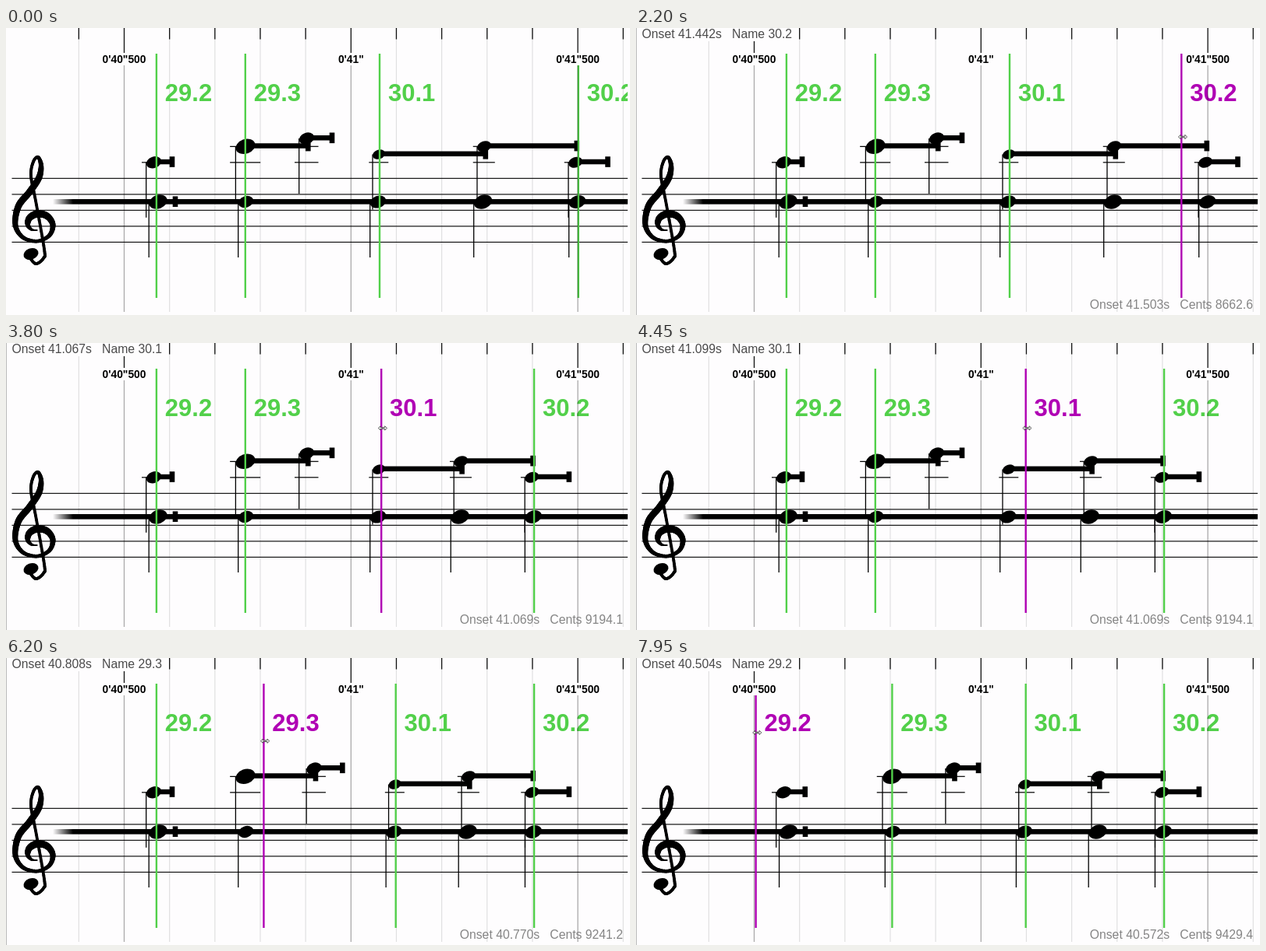
Animation, 800 px wide and 369 px high, one loop 8 s. Source, as an HTML page with a canvas:

```html
<!DOCTYPE html>
<html lang="en">
<head>
<meta charset="utf-8">
<title>Score alignment</title>
<style>
html, body { margin: 0; width: 100%; height: 100%; overflow: hidden; background: #fefdfe; }
canvas { display: block; }
</style>
</head>
<body>
<canvas id="stage" width="800" height="369"></canvas>
<script>
const ctx = document.getElementById('stage').getContext('2d');
const LOOP = 8000, RIGHT = 797, ORIGIN = 151.5, PX_PER_SEC = 581.6;
const STAFF_TOP = 193.3, SPACE = 20.5, LOWER_Y = 223.5;
const PAPER = '#fefdfe', GREEN = '#52d04a', PURPLE = '#b000b4', INK = '#000';

// Barlines in drag order. keys: [time, x]; grip: where the pointer takes hold;
// approach: pointer stops [time, x, y] on the way there.
const bars = [
  { name: '30.2', release: 2650, keys: [[1800, 734], [2500, 677.27]], grip: [735, 142],
    approach: [[0, 470, 385], [600, 196, 95], [1300, 734.3, 162.5], [1400, 736, 162]] },
  { name: '30.1', release: 4550, keys: [[3650, 479.2], [4400, 499.9]], grip: [482.4, 111.454],
    approach: [[2900, 637.1, 132.075], [3000, 568, 119]] },
  { name: '29.3', release: 6400, keys: [[5050, 307], [5450, 330.05], [6200, 330.63], [6400, 328.6]],
    grip: [308.5, 108.747], approach: [] },
  { name: '29.2', release: LOOP, keys: [[7000, 193.1], [LOOP, 153.54]], grip: [193.4, 97.931], approach: [] }
];
for (const b of bars) {
  b.grab = b.keys[0][0];
  b.start = b.keys[0][1];
  b.end = b.keys.at(-1)[1];
}
const pointerKeys = bars.flatMap(b =>
  [...b.approach, [b.grab, ...b.grip], [b.release, b.end, b.grip[1] - 2]]);

// Upper voice: x, scale steps above the lower voice, head size, length (default: up to the next note).
const upperNotes = [
  [189.5, 5, 10, 23.5], [307, 7, 12.8], [385.5, 8, 10, 32.5],
  [478, 6, 8.2], [613, 7, 9.2], [730, 5, 9.2, 41.5]
];
const lowerNotes = [[195, 12], [307.5, 10], [477, 10.5], [611.5, 12], [732.5, 11]];

const linear = k => k;
const smooth = k => k * k * (3 - 2 * k);

function track(keys, t, ease = smooth) {
  const next = keys.findIndex(key => key[0] >= t);
  if (next === 0) return keys[0].slice(1);
  if (next < 0) return keys.at(-1).slice(1);
  const [ta, ...a] = keys[next - 1], [tb, ...b] = keys[next];
  const k = ease((t - ta) / (tb - ta));
  return a.map((v, j) => v + (b[j] - v) * k);
}

const barX = (bar, t) => track(bar.keys, t)[0];
const isDragged = (bar, t) => t >= bar.grab && t < bar.release;
const onset = x => (40.5 + (x - ORIGIN) / PX_PER_SEC).toFixed(3) + 's';
const cents = y => (8305.9 + (162.5 - y) * 17.4).toFixed(1);

function pointerAt(t) {
  const bar = bars.find(b => isDragged(b, t));
  return bar && t > bar.grab ? [barX(bar, t) + 1.5, bar.grip[1] - 2] : track(pointerKeys, t);
}

// Notes keep their place between barlines, which count once released.
function makeWarp(t) {
  const anchors = bars.map(b => [b.start, t >= b.release ? b.end : b.start]).reverse();
  const keys = [[0, 0], ...anchors, [1034, 1034]];
  return x => track(keys, x, linear)[0];
}

function line(x1, y1, x2, y2, width, color = INK) {
  ctx.strokeStyle = color;
  ctx.lineWidth = width;
  ctx.beginPath();
  ctx.moveTo(x1, y1);
  ctx.lineTo(x2, y2);
  ctx.stroke();
}

function text(str, x, y, font, color, align = 'left') {
  ctx.font = font + ' "Liberation Sans", Arial, sans-serif';
  ctx.fillStyle = color;
  ctx.textAlign = align;
  ctx.fillText(str, x, y);
}

function rect(x, y, w, h, color = INK) {
  ctx.fillStyle = color;
  ctx.fillRect(x, y, w, h);
}

function polygon(points) {
  ctx.beginPath();
  for (const p of points) ctx.lineTo(...p);
  ctx.closePath();
}

function head(x, y, size) {
  ctx.fillStyle = INK;
  ctx.beginPath();
  ctx.ellipse(x, y, size, size * 0.73, -0.36, 0, 7);
  ctx.fill();
}

const tailEnd = (x, y) => rect(x - 3.3, y - 6.8, 6.6, 13.6);
const stem = (x, y, size, bottom) => line(x - size + 0.2, y, x - size + 0.2, bottom, 1.3);

// Treble clef as a brush path [x, y, width]: hook, stem and loop, then a spiral.
function makeClef() {
  const path = [
    [29, 293], [38, 303], [48, 296], [49, 284], [38, 222], [32, 190],
    [35, 172], [41, 166], [45, 177], [42, 193], [30, 211], [16, 229]
  ].map(([x, y], i) => [x, y, Math.max(3.8, Math.min(8.5, 2 * i - 10))]);
  for (let s = 0; s <= 1; s += 0.1) {
    const angle = Math.PI * (1 - 2.5 * s), r = 28 - 20 * s;
    const width = (6.8 - 2.3 * Math.sin(angle)) * Math.min(1, 0.3 + 3 * (1 - s));
    path.push([40 + r * Math.cos(angle), 253 + 0.88 * r * Math.sin(angle), width]);
  }
  return path;
}
const clef = makeClef();

function drawClef() {
  const at = i => clef[Math.max(0, Math.min(clef.length - 1, i))];
  ctx.lineCap = 'round';
  let last = clef[0];
  for (let i = 0; i < clef.length - 1; i++) {
    for (let k = 0.1; k < 1.05; k += 0.1) {
      const next = [0, 1, 2].map(j => {
        const [a, b, c, d] = [-1, 0, 1, 2].map(n => at(i + n)[j]);
        return b + k * (c - a + k * (2 * a - 5 * b + 4 * c - d + k * (3 * (b - c) + d - a))) / 2;
      });
      line(last[0], last[1], next[0], next[1], next[2]);
      last = next;
    }
  }
  ctx.lineCap = 'butt';
  head(32, 290.5, 9.8);
}

function drawNotes(warp) {
  const fade = ctx.createLinearGradient(60, 0, 86, 0);
  fade.addColorStop(0, 'rgba(0,0,0,0)');
  fade.addColorStop(1, INK);
  rect(60, LOWER_Y - 3.5, RIGHT - 60, 6.6, fade);
  tailEnd(217, LOWER_Y - 0.3);

  for (const [x0, size] of lowerNotes) {
    const x = warp(x0);
    stem(x, LOWER_Y, size, 295);
    head(x, LOWER_Y, size);
  }

  upperNotes.forEach(([x0, step, size, length], i) => {
    const x = warp(x0), y = LOWER_Y + 0.5 - step * SPACE / 2;
    const end = warp(length ? x0 + length : upperNotes[i + 1][0] + 1.8);
    for (let ledger = STAFF_TOP - SPACE; ledger > y - 4; ledger -= SPACE)
      line(x - size * 1.55, ledger, x + size * 1.5, ledger, 1.2);
    stem(x, y, size, y + 71);
    head(x, y, size);
    line(x, y - 0.7, end, y - 0.7, 6.4);
    tailEnd(end, y - 0.7);
  });
}

function gridLines(draw) {
  for (let i = -1; i <= 11; i++) draw(ORIGIN + i * PX_PER_SEC / 10, i % 5 === 0, i);
}

function drawRuler() {
  gridLines((x, major, i) => {
    line(x, 0, x, major ? 32 : 14.5, 1.3, '#111');
    if (!major) return;
    line(x, 48, x, 365, 1.3, 'rgba(0,0,0,.33)');
    const halves = 81 + i / 5;
    const label = `0'${halves >> 1}"${halves % 2 ? '500' : ''}`;
    const width = label.length * 7.2;
    rect(x - width / 2, 33, width, 15, PAPER);
    text(label, x, 45, 'bold 13.8px', INK, 'center');
  });
}

function outlineCursor() {
  ctx.fillStyle = '#fff';
  ctx.strokeStyle = '#444';
  ctx.lineWidth = 0.9;
  ctx.fill();
  ctx.stroke();
}

function drawArrow(x, y) {
  polygon([[0, 0], [0, 8.5], [2, 6.8], [3.3, 9.6], [4.8, 9], [3.5, 6.2], [6, 6]]
    .map(([dx, dy]) => [x + dx, y + dy]));
  outlineCursor();
}

function drawArms(x, y, count) {
  for (let i = 0; i < count; i++) {
    ctx.save();
    ctx.translate(x, y);
    ctx.rotate(i * 2 * Math.PI / count);
    polygon([[0, -0.8], [2.8, -0.8], [2.8, -2.6], [5.6, 0], [2.8, 2.6], [2.8, 0.8], [0, 0.8]]);
    outlineCursor();
    ctx.restore();
  }
}

function drawPointer(t) {
  const [x, y] = pointerAt(t);
  const overBar = bars.some(b => Math.abs(barX(b, t) - x) < 5);
  if (overBar && y > 155 && y < 180) drawArms(x, y, 4);
  else if (overBar) drawArms(x, y, 2);
  else drawArrow(x, y);
}

function draw(t) {
  const selected = bars.findLast(b => t >= b.grab);

  rect(0, 0, 800, 369, PAPER);
  ctx.save();
  ctx.beginPath();
  ctx.rect(0, 0, RIGHT, 369);
  ctx.clip();
  gridLines((x, major) => major || line(x, 0, x, 365, 1.2, '#e0e0e1'));
  for (let i = 0; i < 5; i++)
    line(7.5, STAFF_TOP + i * SPACE, RIGHT, STAFF_TOP + i * SPACE, 1.3, '#1c1c1c');
  drawClef();
  drawNotes(makeWarp(t));
  for (const b of bars) {
    const x = barX(b, t), color = b === selected ? PURPLE : GREEN;
    line(x - 0.2, 33, x - 0.2, 347, 2.4, color);
    text(b.name, x + 10.7, 93.5, 'bold 31px', color);
  }
  drawRuler();
  ctx.restore();

  if (selected) {
    rect(0, 0, 205, 17, PAPER);
    text(`Onset ${onset(barX(selected, t))}   Name ${selected.name}`, 7.5, 13.2, '15.75px', '#4a4a4a');
    rect(0, 0, 1, 369, '#bbb');
  }

  // The readout trails the pointer and freezes while dragging.
  const readTime = isDragged(selected || bars[0], t) ? Math.min(t - 100, selected.grab) : t - 100;
  const [hx, hy] = pointerAt(readTime);
  if (hy < 366)
    text(`Onset ${onset(hx)}   Cents ${cents(hy)}`, 791, 360.7, '15.75px', '#858585', 'right');
  drawPointer(t);
}

function frame() {
  draw(performance.now() % LOOP);
  requestAnimationFrame(frame);
}
frame();
</script>
</body>
</html>
```
